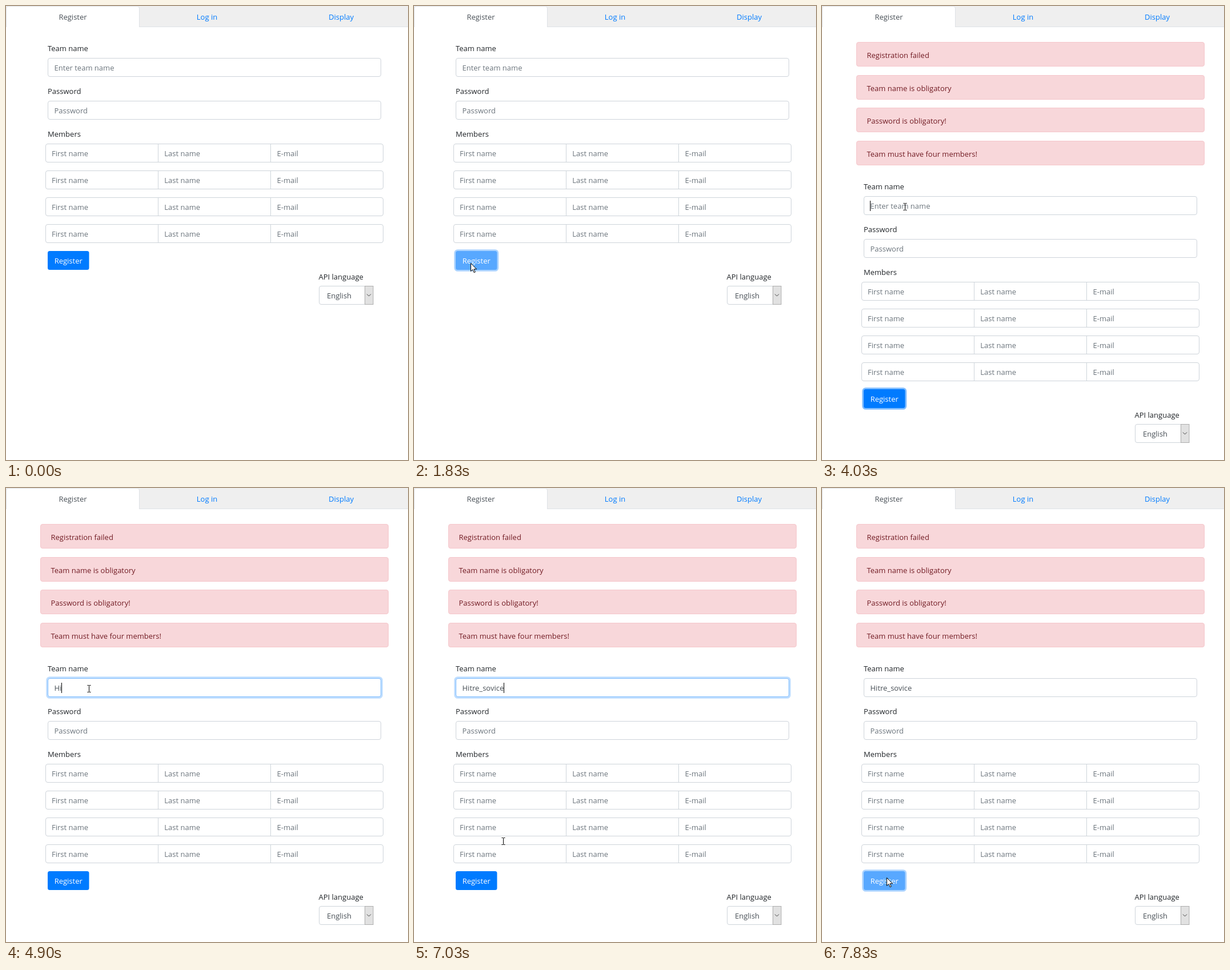
Animation of 704 by 795 pixels, one loop 8000 ms. Source, as an HTML page:

```html
<!DOCTYPE html>
<html lang="en">
<meta charset="utf-8">
<title>Team registration</title>
<style>
html, body { margin: 0; width: 100%; height: 100%; overflow: hidden; background: #fff }
svg { display: block; font: 13px "Open Sans", "Noto Sans", sans-serif }
text { fill: #212529; white-space: pre }
.hint { fill: #6c757d }
.value { fill: #495057 }
.link { fill: #007bff }
.alert { fill: #721c24 }
.mid { text-anchor: middle }
.box { fill: #fff; stroke: #ced4da }
.cursor path { fill: #fff; stroke: #000 }
</style>
<svg id="stage" width="704" height="795" viewBox="0 0 704 795"></svg>
<script>
const LOOP = 8000, SHIFT = 242, RING = 2.8;
const TEAM = 'Hitre_sovice';
const KEYS = [4700, 4900, 5000, 5100, 5200, 5370, 5630, 5870, 5970, 6070, 6170, 6270];

// time, x, y, easing exponent of the move that ends here
const PATH = [
  [600, 82, 769, 1], [870, 88, 553, 1], [1330, 99, 450, 2],
  [3430, 99, 450, 1], [3630, 148, 331, 2], [3800, 148, 331, 1], [3870, 145, 351, 2],
  [6700, 145, 351, 1], [7030, 156, 618, 1], [7430, 113, 682, 2]
];
const POINTERS = [
  [0, ''], [600, 'arrow'], [1170, 'hand'], [1730, 'arrow'], [3438, 'beam'], [3470, 'arrow'],
  [3820, 'beam'], [7180, 'arrow'], [7265, 'hand'], [7700, 'arrow']
];

const text = (x, y, s, cls = '', id = '') => `<text x="${x}" y="${y}" class="${cls}" id="${id}">${s}</text>`;
const box = (x, y, w, id = '') =>
  `<rect class="box" id="${id}" x="${x + .5}" y="${y + .5}" width="${w - 1}" height="32" rx="3.5"/>`;
const ring = (id, x, y, w, h) =>
  `<rect id="${id}" x="${x}" y="${y}" width="${w}" height="${h}" rx="3.5" fill="none" stroke="#007bff"/>`;

const alerts = ['Registration failed', 'Team name is obligatory', 'Password is obligatory!', 'Team must have four members!']
  .map((s, i) => {
    const y = Math.round(63 + i * 57.5);
    return `<rect x="60.5" y="${y + .5}" width="609" height="42" rx="3.5" fill="#f8d7da" stroke="#f5c6cb"/>`
      + text(78.5, y + 28, s, 'alert');
  }).join('');

const members = [241, 288, 335, 382].map(y =>
  box(69, y, 592) + `<path d="M266.5 ${y}v33M463.5 ${y}v33" stroke="#ced4da"/>`
  + ['First name', 'Last name', 'E-mail'].map((s, i) => text(80 + i * 197.3, y + 22, s, 'hint')).join('')
).join('');

stage.innerHTML = `
  <rect width="704" height="36" fill="#efefef"/>
  <path d="M234 36.5H704" stroke="#dee2e6"/>
  <path d="M.5 37V4q0-3.5 3.5-3.5H230q3.5 0 3.5 3.5V37" fill="#fff" stroke="#dee2e6"/>
  ${text(117, 24, 'Register', 'value mid')}
  ${text(352, 24, 'Log in', 'link mid')}
  ${text(587, 24, 'Display', 'link mid')}
  <g id="alerts">${alerts}</g>
  <g id="form">
    ${text(73, 79, 'Team name')}
    ${ring('teamRing', 73, 91, 584, 33)}
    ${box(73, 91, 584, 'teamBox')}
    ${text(84.5, 113, '', '', 'team')}
    <rect id="caret" y="99" width="1" height="18"/>
    ${text(73, 154, 'Password')}
    ${box(73, 166, 584)}
    ${text(84.5, 188, 'Password', 'hint')}
    ${text(73, 229, 'Members')}
    ${members}
    <g id="button">
      ${ring('buttonRing', 73, 429, 72.5, 33)}
      <rect id="buttonFace" x="73" y="429" width="72.5" height="33" rx="3.5"/>
      <text x="109.2" y="451" class="mid" style="fill:#fff">Register</text>
    </g>
    ${text(547.5, 479, 'API language')}
    ${box(548, 490, 95)}
    ${text(562, 512, 'English', 'value')}
    <rect x="628.5" y="490.5" width="14.5" height="32" fill="#e1e1e1" stroke="#adadad"/>
    <path d="M632 504.5l3.5 3.5 3.5-3.5" fill="none" stroke="#444"/>
  </g>
  <g id="cursor" class="cursor">
    <path id="arrow" d="M.5.5V14.5L3.7 11.5 6.2 16.8 8.3 15.9 5.9 10.8H10.6Z"/>
    <path id="beam" style="fill:none" d="M-2.5-5.5h2q1 0 1 1v10q0 1-1 1h-2M3.5-5.5h-2q-1 0-1 1M3.5 6.5h-2q-1 0-1-1"/>
    <path id="hand" d="M-1.5 13V2a1.5 1.5 0 0 1 3 0V8q0-1.5 1.5-1.5 1.5 0 1.5 2 0-1.2 1.5-1.2 1.5 0 1.5 2 0-1 1.3-1 1.7 0 1.7 1.7V15q0 1.5-1.5 3.5V21.5H-.5V19L-5.5 12.5q-.8-2 1-2 1.5 0 3 2.5z"/>
  </g>`;

const $ = id => document.getElementById(id);
const show = (el, on) => el.setAttribute('visibility', on ? 'visible' : 'hidden');
const ramp = (t, a, d = 150) => Math.min(1, Math.max(0, (t - a) / d));
const mix = (a, b, k) => `rgb(${a.map((v, i) => Math.round(v + (b[i] - v) * k))})`;

function setRing(id, k, alpha) {
  $(id).setAttribute('stroke-width', 2 * RING * k);
  $(id).setAttribute('stroke-opacity', alpha * k);
}

function place(t) {
  const i = PATH.findIndex(p => p[0] > t);
  if (i < 0) return PATH.at(-1).slice(1, 3);
  if (i === 0) return PATH[0].slice(1, 3);
  const [a, b] = [PATH[i - 1], PATH[i]];
  const k = 1 - (1 - ramp(t, a[0], b[0] - a[0])) ** b[3];
  return [1, 2].map(n => Math.round(a[n] + (b[n] - a[n]) * k));
}

function draw(t) {
  const failed = t >= 2670;
  show($('alerts'), failed);
  $('form').setAttribute('transform', `translate(0 ${failed ? SHIFT : 0})`);

  // team name field
  const focus = ramp(t, 4030) - ramp(t, 7600);
  const typed = TEAM.slice(0, KEYS.filter(k => k <= t).length);
  const team = $('team');
  team.textContent = typed || 'Enter team name';
  team.setAttribute('class', typed ? 'value' : 'hint');
  $('teamBox').style.stroke = mix([206, 212, 218], [128, 189, 255], focus);
  setRing('teamRing', focus, .25);
  $('caret').setAttribute('x', typed ? Math.round(84.5 + team.getComputedTextLength()) : 84);
  show($('caret'), t >= 4030 && t < 7600 && !(t >= 4570 && t < KEYS[0]));

  // button
  const hover = ramp(t, 1170) - ramp(t, 1680) + ramp(t, 7265) - ramp(t, 7680);
  const waiting = t >= 1730 && t < 2670 || t >= 7700;
  $('buttonFace').setAttribute('fill', mix([0, 123, 255], [0, 105, 217], hover));
  $('button').setAttribute('opacity', waiting ? .65 : 1);
  setRing('buttonRing', ramp(t, 1630) - ramp(t, 4030) + ramp(t, 7600), .5);

  // pointer
  const kind = POINTERS.findLast(p => p[0] <= t)[1];
  for (const id of ['arrow', 'beam', 'hand']) show($(id), id === kind);
  $('cursor').setAttribute('transform', `translate(${place(t)})`);
}

const start = performance.now();
function tick() {
  draw((performance.now() - start) % LOOP);
  requestAnimationFrame(tick);
}
tick();
</script>
</html>
```
